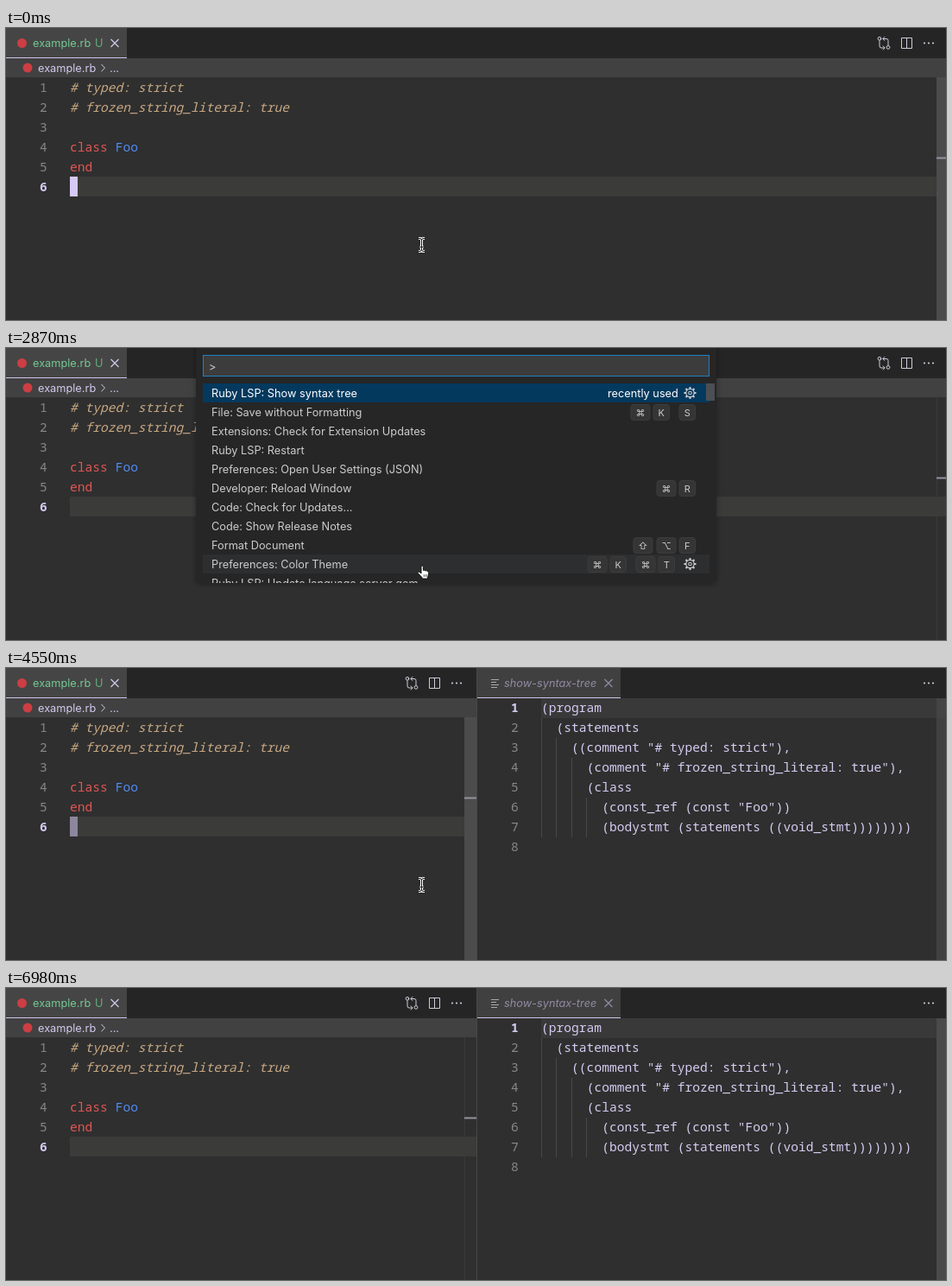
Animation of 1089x338 px, one loop 7.03 s. Source, as an HTML page:

```html
<!DOCTYPE html>
<html lang="en">
<head>
<meta charset="utf-8">
<title>Syntax tree in the editor</title>
<style>
html, body { margin: 0; width: 100%; height: 100%; overflow: hidden; background: #2f2f2f; }
svg { display: block; width: 1089px; height: 338px; }
text { white-space: pre; font: 12.75px Inter, "Open Sans", sans-serif; fill: #d3c9ee; }
.code { font: 500 14.6px "Noto Sans Mono", "DejaVu Sans Mono", monospace; }
.key { font: 11px Inter, "DejaVu Sans", sans-serif; fill: #ccc; text-anchor: middle; }
.item { fill: #ccc; }
.line { fill: none; stroke: #d0cbd9; }
</style>
</head>
<body>
<svg id="stage" viewBox="0 0 1089 338" xmlns="http://www.w3.org/2000/svg"></svg>
<script>
const LOOP = 7030;
const LINE = 23;
const CHAR = 8.78;
const TREE_X = 620;
const stage = document.getElementById("stage");

const escape = s => s.replace(/&/g, "&amp;").replace(/</g, "&lt;").replace(/>/g, "&gt;");
const rect = (x, y, w, h, fill, more = "") =>
  `<rect x="${x}" y="${y}" width="${w}" height="${h}" fill="${fill}" ${more}/>`;
const text = (x, y, s, more = "") => `<text x="${x}" y="${y}" ${more}>${escape(s)}</text>`;
const line = (d, more = "") => `<path class="line" d="${d}" ${more}/>`;
const code = (x, y, s, fill, more = "") =>
  text(x, y, s, `class="code" style="fill:${fill};${more}"`);
const lineNumber = (x, y, n, active) =>
  code(x, y, String(n), active ? "#d3c9ee" : "#878787", active ? "font-weight:600" : "font-weight:400");
const cross = (x, y, color) =>
  line(`M${x - 4.5} ${y - 4.5}l9 9m0 -9l-9 9`, `style="stroke:${color};stroke-width:1.2"`);
const dots = (x, y) =>
  [-5, 0, 5].map(dx => `<circle cx="${x + dx}" cy="${y}" r="1.1" fill="#d0cbd9"/>`).join("");
const fileDot = (x, y) => `<circle cx="${x}" cy="${y}" r="5.5" fill="#cc3e44"/>`;

function gear(x, y) {
  const teeth = Array.from({ length: 8 }, (_, i) =>
    `<path d="M0 -4.6V-7" stroke="#ccc" stroke-width="2" transform="rotate(${i * 45})"/>`).join("");
  return `<g transform="translate(${x} ${y})">${teeth}
    <circle r="4.7" fill="none" stroke="#ccc" stroke-width="1.2"/>
    <circle r="1.8" fill="none" stroke="#ccc" stroke-width="1.1"/></g>`;
}

function key(x, y, label, w) {
  return rect(x, y - 9, w, 18, "#353535", 'rx="3" stroke="#3c3c3c"') +
    text(x + w / 2, y + 4, label, 'class="key"');
}

function sourcePane() {
  const red = "#e35555";
  const comment = "#c8a883";
  const y = n => 73.5 + (n - 1) * LINE;
  const numbers = [1, 2, 3, 4, 5, 6].map(n => lineNumber(39, y(n), n, n === 6)).join("");
  return rect(0, 0, 1089, 338, "#2f2f2f") +
    rect(0, 0, 1089, 35, "#252525") +
    rect(0, 0, 140, 35, "#454545") + rect(0, 34, 140, 1, "#cfc4ec") +
    rect(0, 35, 1089, 22, "#414141") +
    fileDot(18.5, 17.5) + text(31, 22, "example.rb", 'style="fill:#73c991"') +
    text(103, 22, "U", 'style="fill:#62ad7c"') + cross(126, 17.5, "#d3c9ee") +
    fileDot(25, 46) + text(37, 51, "example.rb") +
    line("M110.5 42l4 4.2l-4 4.2") + text(120, 51, "...") +
    rect(74, 172, 1015, LINE, "#3b3b3a") + numbers +
    code(74, y(1), "# typed: strict", comment, "font-style:italic") +
    code(74, y(2), "# frozen_string_literal: true", comment, "font-style:italic") +
    code(74, y(4), "class", red) + code(74 + 6 * CHAR, y(4), "Foo", "#4f8cf0") +
    code(74, y(5), "end", red) +
    `<rect id="block" x="74" y="172" width="9" height="23" fill="#d6c9f5"/>
    <g id="edge">
      ${line("M1014 12.5h-1.5m-.5 2v6.5q0 2 2 2h4m-2.2 -2.4l2.4 2.4l-2.4 2.4M1022 20.5v-6q0 -2 -2 -2h-4m2.2 -2.4l-2.4 2.4l2.4 2.4")}
      <circle class="line" cx="1012" cy="12.3" r="1.9"/><circle class="line" cx="1022" cy="22.4" r="1.9"/>
      ${line("M1037.5 11.5h12v12h-12zM1043.5 11.5v12")}${dots(1069, 17.5)}
      ${rect(1078, 57, 1, 281, "#3a3a3a")}
      <rect id="leftSlider" x="1078" y="57" width="14" height="281" fill="#4c4c4c"/>
      ${rect(1078, 149.5, 14, 2, "#97929f")}
    </g>`;
}

function treePane() {
  const tree = [
    "(program",
    "  (statements",
    '    ((comment "# typed: strict"),',
    '      (comment "# frozen_string_literal: true"),',
    "      (class",
    '        (const_ref (const "Foo"))',
    "        (bodystmt (statements ((void_stmt))))))))",
    ""
  ];
  const rows = tree.map((row, i) => {
    const top = 35 + i * LINE;
    const body = row.trimStart();
    const indent = row.length - body.length;
    let guides = "";
    for (let c = 0; c < indent; c += 2)
      guides += rect(Math.floor(TREE_X + c * CHAR), top, 1, LINE, "#484848");
    return guides + lineNumber(585, top + 16, i + 1, i === 0) +
      code(TREE_X + indent * CHAR, top + 16, body, "#d6ccf2");
  }).join("");
  return rect(545, 0, 544, 338, "#2f2f2f") + rect(545, 0, 544, 35, "#252525") +
    rect(545, 0, 1, 338, "#484848") + rect(546, 0, 166, 35, "#404040") +
    rect(546, 34, 166, 1, "#cfc4ec") +
    line("M562 13.5h9m-9 3h6m-6 3h9m-9 3h7", 'style="stroke:#aaa6b0"') +
    text(577, 22, "show-syntax-tree", 'style="fill:#918aa3;font-style:italic"') +
    cross(698, 17.5, "#918aa3") + dots(1069, 17.5) +
    `<g id="treeBody">${rect(TREE_X, 35, 469, LINE, "#393939")}${rows}
      ${rect(1078, 35, 1, 303, "#3a3a3a")}
      <rect id="rightSlider" x="1078" y="35" width="11" height="303" fill="#4a4a4a"/></g>`;
}

function palette() {
  const commands = [
    "Ruby LSP: Show syntax tree", "File: Save without Formatting",
    "Extensions: Check for Extension Updates", "Ruby LSP: Restart",
    "Preferences: Open User Settings (JSON)", "Developer: Reload Window",
    "Code: Check for Updates...", "Code: Show Release Notes", "Format Document",
    "Preferences: Color Theme", "Ruby LSP: Update language server gem"
  ];
  const mid = i => 52 + i * 22;
  const items = commands.map((s, i) => text(238, mid(i) + 4.8, s,
    `class="item"${i ? "" : ' style="fill:#fff"'}`)).join("");
  const keys = [
    [724, 1, "⌘"], [750, 1, "K"], [780, 1, "S"],
    [754, 5, "⌘"], [780, 5, "R"],
    [727, 8, "⇧"], [754, 8, "⌥"], [780, 8, "F"],
    [674, 9, "⌘"], [700, 9, "K"], [730, 9, "⌘"], [756, 9, "T"]
  ].map(([x, row, s]) => key(x, mid(row) + .5, s, s < "a" ? 18.5 : 22)).join("");
  return rect(220, -10, 603, 283, "#252526", 'rx="6" filter="url(#shadow)"') +
    rect(228.5, 8.5, 586, 24, "#3c3c3c", 'stroke="#2280c4"') +
    text(235, 25.5, ">", 'class="item"') +
    rect(242, 13, 1, 15, "#ccc", 'id="caret"') +
    `<g clip-path="url(#list)">${rect(228, 41, 587, 22, "#04395e")}
      ${rect(228, 239, 587, 22, "#2d2e2f")}${items}
      ${text(697, 56.8, "recently used", 'style="fill:#fff"')}
      ${keys}${gear(792.5, 52)}${gear(792.5, 250)}
      ${rect(811, 41, 10, 20, "#4b4f54")}</g>`;
}

const ibeam = "M-3.5 -7.5h1q2.5 0 2.5 2q0 -2 2.5 -2h1M0 -6V6M-3.5 7.5h1q2.5 0 2.5 -2q0 2 2.5 2h1M-2 2.5h4";
const hand = "M-2 1V-5.5q0 -1.5 1.2 -1.5t1.2 1.5V-1.6q1.8 -.8 2.4 .4q1.6 -.6 2.1 .7q1.8 -.3 1.8 1.2V3q0 2 -1.2 3.2V8H-1V6.6L-5.8 1.6q-.6 -1.4 .7 -1.7q1 -.2 3.1 2.2z";

stage.innerHTML = `<defs>
    <clipPath id="list">${rect(220, 41, 603, 231, "#fff")}</clipPath>
    <filter id="shadow" x="-5%" y="-5%" width="110%" height="115%">
      <feDropShadow dx="0" dy="0" stdDeviation="3" flood-opacity=".4"/></filter>
  </defs>
  <g>${sourcePane()}</g>
  <g id="tree">${treePane()}</g>
  <g id="palette">${palette()}</g>
  <g id="ibeam" fill="none">
    <path d="${ibeam}" stroke="#fff" stroke-width="3"/>
    <path d="${ibeam}" stroke="#111" stroke-width="1"/></g>
  <g id="hand" transform="translate(483 259)">
    <path d="${hand}" fill="#fff" stroke="#111" stroke-width="1"/>
    <path d="M1.2 3v3M3.2 3v3M5 3v3" stroke="#222" stroke-width=".7"/></g>`;

const el = Object.fromEntries([...stage.querySelectorAll("[id]")].map(n => [n.id, n]));
const show = (node, on) => node.setAttribute("visibility", on ? "visible" : "hidden");
const opacity = (node, v) => node.setAttribute("opacity", v);
const ramp = (t, from, to) => Math.min(1, Math.max(0, (t - from) / (to - from)));
const ease = p => p * p * (3 - 2 * p);
const mix = (a, b, p) => a + (b - a) * p;

// Each blink fades in three short steps.
const fadeOut = [180, 1180, 3980, 4930, 5870, 6860];
const fadeIn = [830, 3280, 4550, 5500, 6450];
function blink(t) {
  const latest = list => Math.max(-1000, ...list.filter(s => s <= t));
  const off = latest(fadeOut), on = latest(fadeIn);
  const step = age => age < 60 ? 0 : age < 110 ? 1 : 2;
  if (off < 0 || on === 3280 && off < on) return 1;
  return off > on ? [.75, .3, 0][step(t - off)] : [.53, .9, 1][step(t - on)];
}

function pointer(t) {
  if (t < 4610) return [481.5, 251];
  if (t < 4660) return [600, 251];
  if (t < 6160) {
    const p = ease(ramp(t, 4890, 5580));
    return [mix(760, 906.5, p), mix(251, 247, p)];
  }
  const p = ramp(t, 6100, 6500);
  return [mix(906.5, 994, p), mix(247, 350, p * p)];
}

// Scrollbars appear at once and fade slowly when left alone.
const leftSlider = t => t < 3280 ? 1 - ramp(t, 1410, 2210)
  : ramp(t, 3280, 3380) * (1 - ramp(t, 4610, 5410));
const rightSlider = t => t < 3810 ? 0 : t < 4610 ? 1 - ramp(t, 4310, 5110) : 1;

function draw(t) {
  const open = t >= 1470 && t < 3280;
  const split = t >= 3340;
  const overHand = t >= 1410 && t < 3280;
  show(el.palette, open);
  show(el.caret, open && (t < 1930 || t >= 2390 && t < 2870));
  show(el.tree, split);
  opacity(el.treeBody, t >= 3390 ? 1 : 0);
  opacity(el.block, blink(t));
  el.edge.setAttribute("transform", `translate(${split ? -547 : 0} 0)`);
  opacity(el.leftSlider, leftSlider(t));
  opacity(el.rightSlider, rightSlider(t));
  show(el.hand, overHand);
  show(el.ibeam, !overHand && t < 6560);
  el.ibeam.setAttribute("transform", `translate(${pointer(t).join(" ")})`);
}

function tick() {
  draw(performance.now() % LOOP);
  requestAnimationFrame(tick);
}
tick();
</script>
</body>
</html>
```
